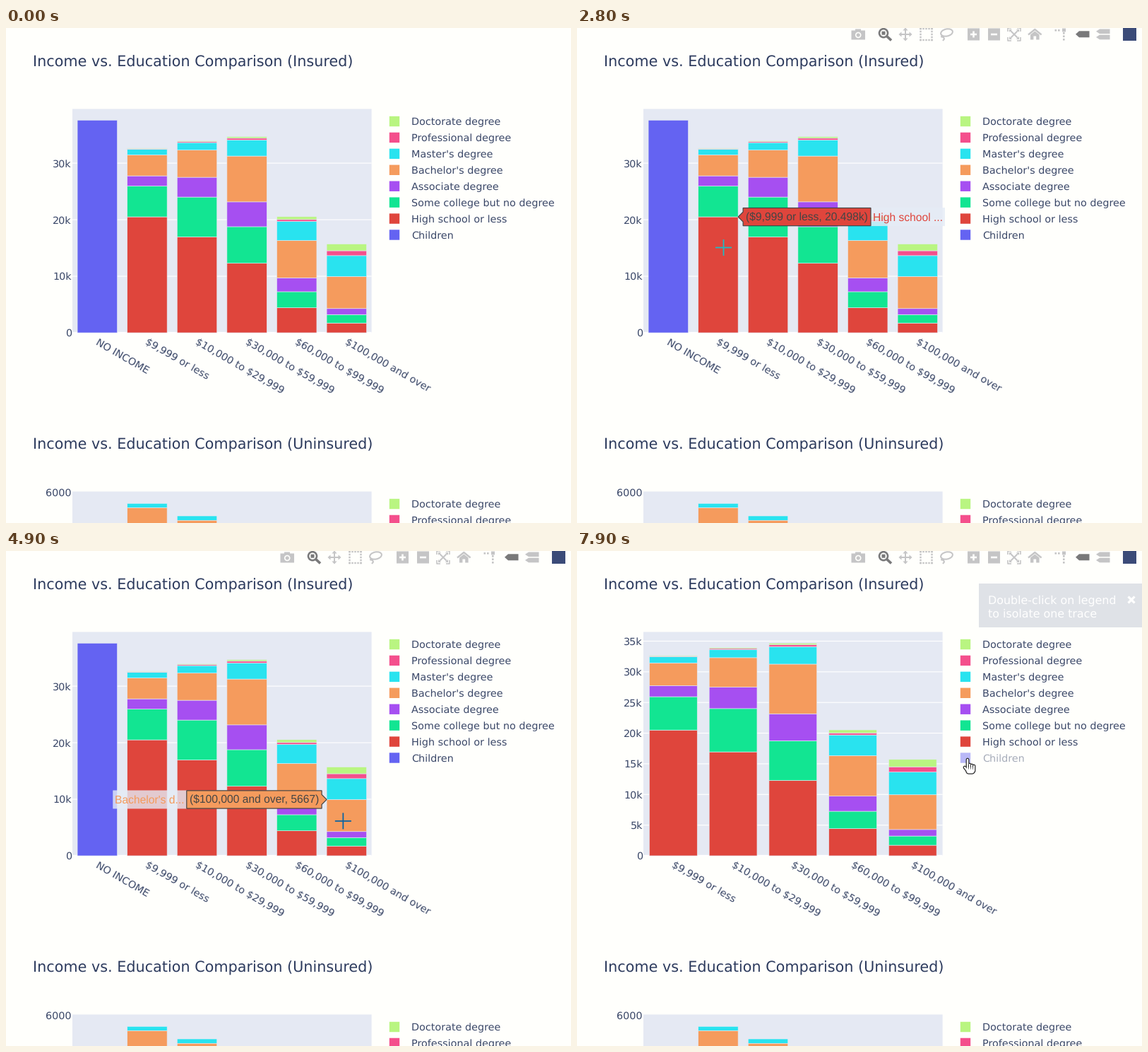
A matplotlib script that plays this animation: 800 by 700 pixels, repeating every 8000 ms.

```python
import numpy as np
import matplotlib.pyplot as plt
from matplotlib.animation import FuncAnimation
from matplotlib.colors import to_rgb
from matplotlib.lines import Line2D
from matplotlib.patches import Circle, Ellipse, Polygon, Rectangle

W, H, DPI = 800, 700, 100
PX = 72 / DPI
STEP, FRAMES = 100, 80

PAGE, PLOT, PALE = "#FFFFFC", "#E5E9F3", "#E5ECF6"
HEAD, INK, DARK = "#2D3B5E", "#3A4768", "#444444"
IDLE, ACTIVE = "#C5C5C6", "#79797A"
LEFT, RIGHT, TOP, BASE = 94, 517.6, 114.5, 431
SECOND = 541
CLICK = 7700

SERIES = {
    "Children": "#6463F2",
    "High school or less": "#DF453C",
    "Some college but no degree": "#12E592",
    "Associate degree": "#A64FF1",
    "Bachelor's degree": "#F59B5D",
    "Master's degree": "#29E3EF",
    "Professional degree": "#F44F8C",
    "Doctorate degree": "#B9F581",
}
NAMES, COLORS = list(SERIES), list(SERIES.values())

# people per income group, stacked in the order of SERIES
GROUPS = {
    "NO INCOME": [37600],
    "$9,999 or less": [0, 20498, 5440, 1810, 3700, 1000, 90, 110],
    "$10,000 to $29,999": [0, 16940, 7060, 3500, 4800, 1330, 170, 150],
    "$30,000 to $59,999": [0, 12290, 6471, 4390, 8100, 2850, 310, 260],
    "$60,000 to $99,999": [0, 4420, 2840, 2460, 6609, 3370, 330, 500],
    "$100,000 and over": [0, 1720, 1500, 1060, 5667, 3700, 860, 1200],
}

# pointer stops: time in ms, x, y
STOPS = [(100, 13, 530), (900, 31, 500), (1500, 127, 454), (2100, 150, 345),
         (2350, 150, 345), (2800, 207.5, 310.5), (3600, 290, 340),
         (4000, 382.5, 306), (5300, 505, 404), (5900, 498, 355.5),
         (6300, 511, 298), (7100, 553, 294)]

plt.rcParams.update({"text.hinting": "none", "font.family": "DejaVu Sans",
                     "text.parse_math": False, "toolbar": "None"})
fig = plt.figure(figsize=(W / DPI, H / DPI), dpi=DPI, facecolor=PAGE)
ax = fig.add_axes([0, 0, 1, 1])
ax.set(xlim=(0, W), ylim=(H, 0))
ax.axis("off")


def put(patch, color, edge="none", lw=0.0, **kw):
    patch.set(facecolor=color, edgecolor=edge, linewidth=lw * PX, snap=False,
              **kw)
    return ax.add_patch(patch)


def rect(x0, y0, x1, y1, color, *args, **kw):
    return put(Rectangle((x0, y0), x1 - x0, y1 - y0), color, *args, **kw)


def poly(points, color, *args, **kw):
    return put(Polygon(points, closed=True), color, *args, **kw)


def line(xs, ys, color, lw=1.0, cap="butt", **kw):
    return ax.add_line(Line2D(xs, ys, color=color, lw=lw * PX, snap=False,
                              solid_capstyle=cap, **kw))


def text(x, cy, s, size=14.4, color=INK, **kw):
    return ax.text(x, cy + 0.365 * size, s, fontsize=size * PX, color=color,
                   va="baseline", **kw)


class Chart:
    """Stacked bars for a set of groups, scaled to the tallest one."""

    def __init__(self, groups, tick):
        self.names, self.values = list(groups), list(groups.values())
        self.tick = tick
        self.top = max(map(sum, self.values)) / 0.95
        self.step = (RIGHT - LEFT) / len(groups)

    def y(self, value):
        return BASE - value * (BASE - TOP) / self.top

    def bar(self, i):
        return LEFT + (i + 0.1) * self.step, LEFT + (i + 0.9) * self.step

    def segments(self, i):
        total = 0
        for k, v in enumerate(self.values[i]):
            if v:
                yield k, v, self.y(total), self.y(total + v)
            total += v

    def hit(self, x, y):
        """Segment under a point, as (group, series, value, top edge)."""
        if LEFT < x < RIGHT:
            i = int((x - LEFT) / self.step)
            x0, x1 = self.bar(i)
            if x0 <= x <= x1:
                for k, v, low, high in self.segments(i):
                    if high <= y < low:
                        return i, k, v, high
        return None

    def draw(self):
        parts = []
        for v in range(0, int(self.top), self.tick):
            y = self.y(v)
            parts += [line([LEFT, RIGHT], [y, y], "white", 1.2 if v else 2.4),
                      text(93, y, f"{v // 1000}k" if v else "0", ha="right")]
        for i, name in enumerate(self.names):
            x0, x1 = self.bar(i)
            parts += [rect(x0, high, x1, low, COLORS[k], PALE, 0.6, zorder=3)
                      for k, _, low, high in self.segments(i)]
            parts.append(ax.text((x0 + x1) / 2 - 3.5, 446.5, name, color=INK,
                                 fontsize=14.4 * PX, rotation=-30,
                                 rotation_mode="anchor", va="baseline"))
        return parts


def draw_panel(dy, title):
    """Title, plot area and legend; returns the last legend entry."""
    text(38, 47.3 + dy, title, 20.8, HEAD)
    rect(LEFT, TOP + dy, RIGHT, BASE + dy, PLOT)
    for n, name in enumerate(reversed(NAMES)):
        y = 132 + 22.93 * n + dy
        entry = (rect(542.8, y - 7.2, 557.2, y + 7.2, SERIES[name]),
                 text(574, y, name, clip_on=True))
    return entry


def draw_toolbar():
    def disc(x, y, r, color):
        return put(Circle((x, y), r), color)

    def tag(x, y, h, color):
        return poly([(x, y), (x + 5, y - h), (x + 19.5, y - h),
                     (x + 19.5, y + h), (x + 5, y + h)], color)

    # camera, magnifier
    parts = [rect(388.5, 3.5, 408, 16.5, IDLE), rect(394, 1.5, 402, 5, IDLE),
             disc(398.2, 10, 4.3, PAGE), disc(398.2, 10, 2.6, IDLE),
             line([438, 445], [11, 17.5], ACTIVE, 3.6),
             disc(434, 7.2, 7.3, ACTIVE), disc(434, 7.2, 4.7, PAGE),
             rect(431.5, 4.7, 436.5, 9.7, ACTIVE)]

    # four-way arrows
    for angle in np.arange(4) * np.pi / 2:
        out = np.array([np.cos(angle), np.sin(angle)])
        side = 3.6 * out[::-1] * [-1, 1]
        mid = np.array([465, 9])
        parts += [line(*zip(mid, mid + 6 * out), IDLE, 2),
                  poly([mid + 9.5 * out, mid + 5.5 * out + side,
                        mid + 5.5 * out - side], IDLE)]

    # dotted frame and corner arrows
    for a in np.linspace(-8, 8, 5):
        for b in (-8, 8):
            for x, y in ((a, b), (b, a)):
                parts.append(rect(493.3 + x, 7.8 + y, 495.7 + x, 10.2 + y,
                                  IDLE))
    for sx in (-1, 1):
        for sy in (-1, 1):
            u, v = 619 + sx * np.arange(10), 9 + sy * np.arange(10)
            parts += [line([u[4], u[9], u[9]], [v[9], v[9], v[4]], IDLE, 1.6),
                      line([u[0], u[5]], [v[0], v[5]], IDLE, 2),
                      poly([(u[7], v[7]), (u[3], v[7]), (u[7], v[3])], IDLE)]

    # lasso
    parts += [put(Ellipse((523.5, 6.5), 17, 10, angle=-12), "none", IDLE, 2),
              line([517, 516, 519, 520, 518], [10, 12.5, 13, 15.5, 18],
                   IDLE, 2)]

    # zoom buttons
    for x in (561.5, 590.5):
        parts += [rect(x - 8.5, 0.5, x + 8.5, 17.5, IDLE),
                  line([x - 4.5, x + 4.5], [9, 9], PAGE, 2.6)]
    parts.append(line([561.5, 561.5], [4.5, 13.5], PAGE, 2.6))

    # house, spike lines
    parts += [line([639, 648.3, 657.6], [9.5, 2, 9.5], IDLE, 2.4),
              poly([(642, 9.5), (648.3, 4.5), (654.6, 9.5), (654.6, 16.5),
                    (642, 16.5)], IDLE),
              rect(646.4, 11.5, 650.2, 17, PAGE),
              rect(687, 0.6, 692, 5.4, IDLE)]
    for n in range(3):
        parts.append(rect(688, 6 + 4.5 * n, 690.6, 8.6 + 4.5 * n, IDLE))
    for x in (676.5, 681):
        parts.append(rect(x, 2, x + 2.6, 4.6, IDLE))

    return parts + [tag(706, 8.8, 4.5, ACTIVE), tag(735, 4.8, 3.3, IDLE),
                    tag(735, 13, 3.3, IDLE), rect(773, 0, 792, 18, "#3B4B78")]


def draw_hover(chart, spot):
    i, k, v, y = spot
    name, color = NAMES[k], COLORS[k]
    ink = "white" if k == 0 else DARK
    amount = f"{v / 1000:g}k" if v >= 10000 else str(v)
    short = name if len(name) <= 15 else name[:12] + "..."
    font = dict(size=15.6, family="Liberation Sans", zorder=12)
    label = ax.text(0, y + 5.6, f"({chart.names[i]}, {amount})", color=ink)
    tag = ax.text(0, y + 5.6, short, color=color)
    for t in (label, tag):
        t.set(fontsize=15.6 * PX, family=font["family"], zorder=font["zorder"])
    wide = label.get_window_extent().width + 8
    extra = tag.get_window_extent().width + 6

    # flip to the left side when the label would leave the stage
    x0, x1 = chart.bar(i)
    tip, d = (x0, -1) if x1 + 7 + wide + extra > W else (x1, 1)
    near = tip + 7 * d
    far = near + wide * d
    end = far + extra * d
    label.set_x(min(near, far) + 4)
    tag.set_x(min(far, end) + 3)
    half = 12.6
    outline = [(tip, y), (near, y - 7), (near, y - half), (far, y - half),
               (far, y + half), (near, y + half), (near, y + 7)]
    return [label, tag,
            rect(far, y - 13, end, y + 13, PALE, alpha=0.8, zorder=10),
            poly(outline, color, ink, 1.2, zorder=11)]


def draw_cross(chart, x, y):
    """Crosshair whose arms invert the colour beneath them."""
    parts = []
    for dx, dy in ((-1, 0), (1, 0), (0, -1), (0, 1)):
        spot = chart.hit(x + 6 * dx, y + 6 * dy)
        under = to_rgb(COLORS[spot[1]] if spot else PLOT)
        parts.append(line([x, x + 11.5 * dx], [y, y + 11.5 * dy],
                          [1 - c for c in under], 1.8, zorder=20))
    return parts


def draw_arrow(x, y):
    shape = [(0, 0), (0, 16.5), (3.8, 13), (6.4, 18.6), (8.8, 17.6),
             (6.4, 12), (11.5, 11.6)]
    return [poly(np.add(shape, (x, y)), "white", "#222222", 1.2, zorder=20)]


def draw_hand(x, y):
    parts = []
    for color, grow, z in (("#222222", 2.4, 20), ("white", 0, 21)):
        for n in range(4):
            top = y + 1 + (6 + n if n else 0)
            parts.append(line([x + 3 * n] * 2, [top, y + 17], color,
                              2.4 + grow, "round", zorder=z))
        parts += [line([x - 4, x], [y + 12, y + 17], color, 2.4 + grow,
                       "round", zorder=z),
                  line([x + 1.5, x + 6.5], [y + 17.5] * 2, color, 6 + grow,
                       "round", zorder=z)]
    for n in range(3):
        parts.append(line([x + 1.5 + 3 * n] * 2, [y + 8, y + 12], "#222222",
                          0.9, zorder=22))
    return parts


def draw_notice(alpha):
    parts = [rect(569, 46, W, 108, "#8C97AF", alpha=alpha, zorder=15),
             text(582, 69, "Double-click on legend", 15.9, "white", zorder=16),
             text(582, 88, "to isolate one trace", 15.9, "white", zorder=16)]
    for s in (-4.5, 4.5):
        parts.append(line([780.5, 789.5], [69 - s, 69 + s], "white", 3.2,
                          zorder=16))
    return parts


def pointer(t):
    """Ease from stop to stop."""
    for (t0, *a), (t1, *b) in zip(STOPS, STOPS[1:]):
        if t < t1:
            u = max(0, (t - t0) / (t1 - t0))
            return np.add(a, np.subtract(b, a) * u * u * (3 - 2 * u))
    return np.array(STOPS[-1][1:])


first_entry = draw_panel(0, "Income vs. Education Comparison (Insured)")
draw_panel(SECOND, "Income vs. Education Comparison (Uninsured)")

full = Chart(GROUPS, 10000)
trimmed = Chart(dict(list(GROUPS.items())[1:]), 5000)
full_parts, trimmed_parts = full.draw(), trimmed.draw()

# visible tops of the lower chart's bars
text(93, 656.5, "6000", ha="right")
for i, y in ((1, 672.3), (2, 690)):
    x0, x1 = full.bar(i)
    rect(x0, y, x1, y + 6.3, COLORS[5], PALE, 0.6, zorder=3)
    rect(x0, y + 6.3, x1, H + 9, COLORS[4], PALE, 0.6, zorder=3)

toolbar = draw_toolbar()
moving = []


def update(n):
    t = n * STEP
    clicked = t >= CLICK
    while moving:
        moving.pop().remove()

    for p in full_parts:
        p.set_visible(not clicked)
    for p in trimmed_parts:
        p.set_visible(clicked)
    for p in first_entry:
        p.set_alpha(0.45 if clicked else 1)
    for p in toolbar:
        p.set_alpha(min(t / 400, 1))

    if t >= STOPS[0][0]:
        x, y = pointer(t)
        # the label trails the pointer by one step
        spot = full.hit(*pointer(t - STEP))
        if spot:
            moving.extend(draw_hover(full, spot))
        if LEFT < x < RIGHT and TOP < y < BASE:
            moving.extend(draw_cross(full, x, y))
        elif x > 541:
            moving.extend(draw_hand(x, y))
        else:
            moving.extend(draw_arrow(x, y))
    if clicked:
        moving.extend(draw_notice(0.09 * (1 + (t - CLICK) / STEP)))
    return []


anim = FuncAnimation(fig, update, frames=FRAMES, interval=STEP, repeat=True,
                     repeat_delay=0, blit=False)
plt.show()
```
